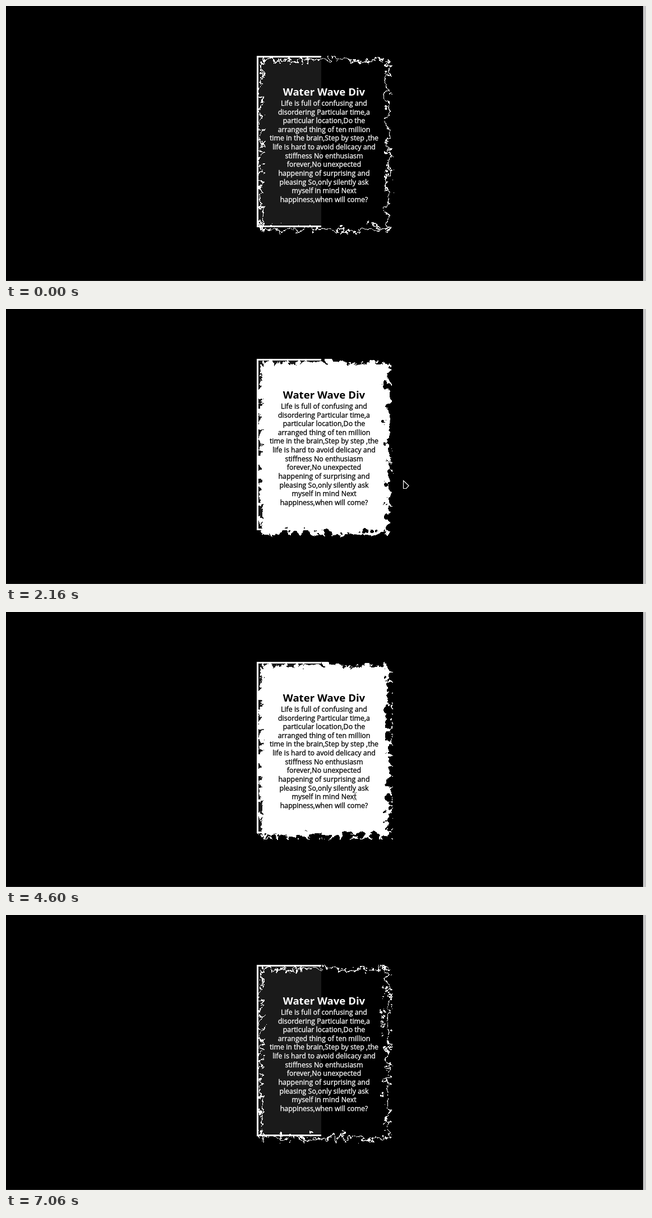
An HTML page that plays this animation: 1141x491 px, repeating every 7.25 s.

```html
<!DOCTYPE html>
<html lang="en">
<head>
<meta charset="utf-8">
<title>Water Wave Div</title>
<style>
  html, body { margin: 0; width: 100%; height: 100%; overflow: hidden; background: #000; }
  #stage { position: absolute; left: 0; top: 0; width: 1141px; height: 491px; overflow: hidden; background: #000; }
  #stage > * { position: absolute; box-sizing: border-box; }
  #panel { left: 447px; top: 89px; width: 115px; height: 306px; border: 3px solid #fff; border-right: 0; background: #1a1a1a; }
  #wave { left: 447px; top: 89px; width: 230px; height: 306px; border: 3px solid #fff; filter: url(#water); }
  #bar { left: 1136px; top: 0; width: 5px; height: 491px; background: #c6c6c6; border-left: 1px solid #e4e4e4; }
  #floor { left: 0; top: 490px; width: 1136px; height: 1px; background: #222; }
  #front { left: 0; top: 0; }
  text {
    font-family: "Open Sans", "Noto Sans", sans-serif; font-size: 12.4px; text-anchor: middle;
    fill: currentColor; stroke: currentColor; stroke-width: .3px;
  }
  #title { font-size: 18.6px; font-weight: 700; stroke: none; }
</style>
</head>
<body>
<div id="stage">
  <div id="panel"></div>
  <div id="wave"></div>
  <div id="floor"></div>
  <div id="bar"></div>
  <svg id="front" width="1141" height="491">
    <filter id="water">
      <feTurbulence id="noise" x="0" y="0" baseFrequency="0.049" numOctaves="5" seed="2"/>
      <feDisplacementMap in="SourceGraphic" scale="30"/>
    </filter>
    <g id="words"><text id="title" x="567" y="160">Water Wave Div</text></g>
    <path id="arrow" d="M.5 .5L10 9.5L5.5 14.5H.5Z" fill="#000" stroke="#fff" stroke-width="1.2"/>
    <path id="beam" d="M-2.5 -6.5H-.5L.5 -5.5L1.5 -6.5H3.5M.5 -5.5V5.5M-2.5 6.5H-.5L.5 5.5L1.5 6.5H3.5" fill="none" stroke="#555"/>
  </svg>
</div>
<script>
const $ = id => document.getElementById(id);
const LOOP = 7250;

const LINES = [
  'Life is full of confusing and',
  'disordering Particular time,a',
  'particular location,Do the',
  'arranged thing of ten million',
  'time in the brain,Step by step ,the',
  'life is hard to avoid delicacy and',
  'stiffness No enthusiasm',
  'forever,No unexpected',
  'happening of surprising and',
  'pleasing So,only silently ask',
  'myself in mind Next',
  'happiness,when will come?'
];
LINES.forEach((line, i) => {
  const el = document.createElementNS($('front').namespaceURI, 'text');
  el.setAttribute('x', 567);
  el.setAttribute('y', Math.round(178 + i * 15.62));
  el.textContent = line;
  $('words').append(el);
});

// The picture refreshes about five times a second.
const STEP = 202, LEAD = 65, STEPS = 36;
function hold(t) {
  const n = Math.min(STEPS - 1, Math.floor((t + LEAD) / STEP));
  return Math.max(0, n * STEP - LEAD);
}

// Key points of the pointer: [time, x, y]
const PATH = [
  [765, 851, 372], [1360, 664, 312], [1960, 669, 310], [2160, 709, 306],
  [2460, 850, 320], [3170, 687, 331], [3570, 625, 328], [4600, 622, 329],
  [4810, 794, 362], [5600, 945, 397], [6400, 1130, 495]
];
function pointer(t) {
  const i = PATH.findIndex(p => p[0] > t);
  if (i < 1) return null;
  const [a, b] = [PATH[i - 1], PATH[i]];
  const k = (t - a[0]) / (b[0] - a[0]);
  return [a[1] + (b[1] - a[1]) * k, a[2] + (b[2] - a[2]) * k];
}

// Hover fade, half a second each way
const ease = p => 1 - Math.pow(1 - Math.min(1, Math.max(0, p)), 2.2);
const fade = (t, on, off) => ease((t - on) / 500) - ease((t - off) / 500);
const hover = t => fade(t, 1350, 2160) + fade(t, 3180, 4700);

function place(el, pos, shown) {
  el.style.display = shown ? '' : 'none';
  if (shown) el.setAttribute('transform', `translate(${pos.map(Math.round)})`);
}

function draw(t) {
  const lit = hover(t);
  const ink = Math.round(255 * (1 - lit));
  $('noise').setAttribute('baseFrequency', (0.049 + t * 1e-6).toFixed(6));
  $('wave').style.backgroundColor = `rgba(255,255,255,${lit.toFixed(3)})`;
  $('words').style.color = `rgb(${ink},${ink},${ink})`;
  const pos = pointer(t);
  const onText = pos && pos[0] < 645;
  place($('arrow'), pos, pos && !onText);
  place($('beam'), pos, onText);
}

let last = -1;
const begin = performance.now();
function tick() {
  const t = hold((performance.now() - begin) % LOOP);
  if (t !== last) draw(last = t);
  requestAnimationFrame(tick);
}
tick();
</script>
</body>
</html>
```
